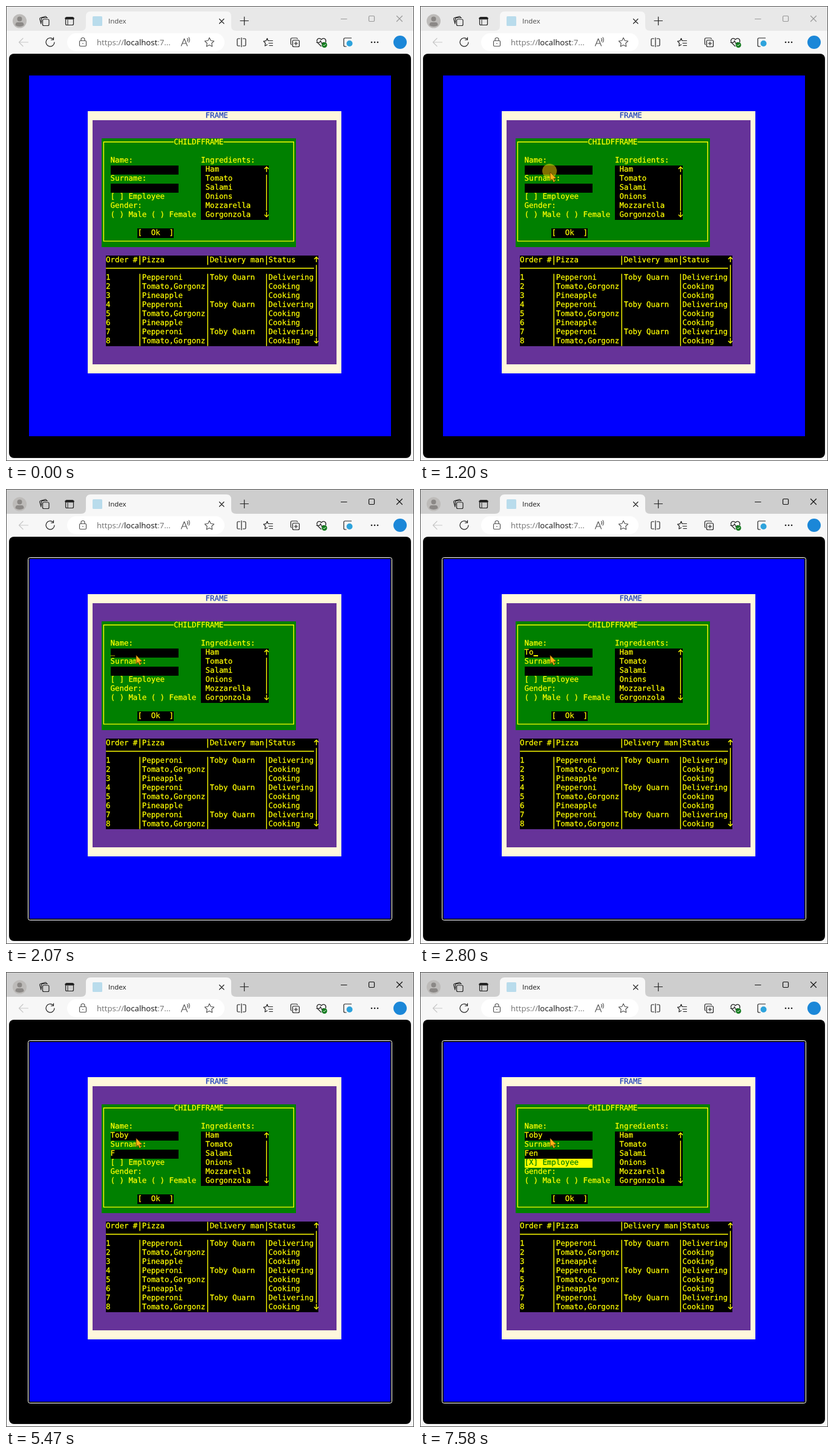
An HTML page for the animation above (8 s loop, 674 px wide and 753 px high).

```html
<!DOCTYPE html>
<html lang="en">
<head>
<meta charset="utf-8">
<title>Index</title>
<style>
  html, body { margin: 0; width: 100%; height: 100%; overflow: hidden; background: #f7f7f7; }
  svg { display: block; width: 674px; height: 753px; }
  text { white-space: pre; }
  .term { font: 12.4px "DejaVu Sans Mono", monospace; text-rendering: geometricPrecision; }
  .term text { stroke-width: .25; }
  .ui { font-family: "Open Sans", "Noto Sans", sans-serif; }
  .icon { fill: none; stroke: #222; stroke-width: 1.2; stroke-linecap: round; stroke-linejoin: round; }
</style>
</head>
<body>
<svg id="stage" viewBox="0 0 674 753">
  <rect width="674" height="753" fill="#f7f7f7"/>
  <path id="titleBar" d="M0 0H674V41H0Z"/>
  <path d="M124 41Q132 41 132 33V17Q132 9 140 9H364Q372 9 372 17V33Q372 41 380 41Z" fill="#f7f7f7"/>
  <path d="M0 .5H674M.5 0V753M673.5 0V753M0 752.5H674" stroke="#555" fill="none"/>

  <!-- title bar -->
  <circle cx="22.5" cy="25" r="11.5" fill="#bdbbb9"/>
  <circle cx="22.5" cy="21.5" r="4" fill="#8b8886"/>
  <path d="M15.5 32Q15.5 27 19 27H26Q29.5 27 29.5 32Q22.5 36 15.5 32Z" fill="#8b8886"/>
  <g class="icon">
    <rect x="60.5" y="22" width="10.5" height="10.5" rx="2"/>
    <path d="M58 29.5L55.8 21.5Q55.5 20 57 19.5L65 17.3Q66.5 17 67 19M58.5 27V21.5Q58.5 19.5 60.5 19.5H68.5"/>
    <rect x="98.5" y="18.5" width="13" height="13" rx="2"/>
    <path d="M99 20.5H111" stroke-width="3.5"/>
    <path d="M102 23V31" stroke-width="1"/>
    <path d="M352.5 21.5L360 29M360 21.5L352.5 29M387 24.5H400.5M393.7 18V31.5"/>
  </g>
  <rect x="143" y="17" width="16" height="16" rx="1.5" fill="#b9dcec"/>
  <text id="tabTitle" class="ui" x="169" y="29" font-size="11.5">Index</text>
  <g id="windowKeys" class="icon" stroke-width="1">
    <path d="M553.5 21.5H563M645.5 16.5L654.5 25.5M654.5 16.5L645.5 25.5"/>
    <rect x="599.5" y="16.5" width="9" height="9" rx="1.5"/>
  </g>

  <!-- toolbar -->
  <rect x="101" y="45" width="260" height="30" rx="15" fill="#fff"/>
  <text class="ui" x="150" y="65" font-size="13.2" fill="#707070">https://<tspan fill="#111">localhost</tspan>:7...</text>
  <g class="icon">
    <path d="M36.5 60H22M28 53.5L21.5 60L28 66.5" stroke="#c8c8c8"/>
    <path d="M80 60A7 7 0 1 1 77.5 54.5M78.5 52V56H74.5"/>
    <g stroke="#555">
      <rect x="121.5" y="57.5" width="11" height="9" rx="1.5"/>
      <path d="M124 57V55.5A3 3 0 0 1 130 55.5V57M127 61.5V62.5"/>
      <path d="M289.5 66L294.5 54L299.5 66M291.5 62H297.5M299.5 53.5Q301.5 56 299.5 58.5M302 52Q304.5 56 302 60"/>
    </g>
    <path id="star" stroke="#555"/>
    <path d="M386.5 54H383.5Q382 54 382 55.5V64.5Q382 66 383.5 66H386.5M391.5 54H394.5Q396 54 396 55.5V64.5Q396 66 394.5 66H391.5M389 52.5V67.5"/>
    <path d="M433 57.5L431.5 53.5L429.5 57.7L425.5 58.3L428.5 61.5L427.8 66L431.5 64M434 57.5H440.5M434 61.5H440.5M435 65.5H440.5"/>
    <rect x="473.5" y="56.5" width="11" height="11" rx="2"/>
    <path d="M471.5 64Q470.5 63.5 470.5 62V55Q470.5 53 472.5 53H479Q481 53 481.5 54M479 59.2V64.8M476.2 62H481.8"/>
    <path d="M520.5 66.5L514.5 60.5Q512.5 57 515 54.5Q518 52.3 521 55.5Q524 52.3 527 54.5Q529.5 57 528 60M513 60.5H518L519.5 57.5L522 62.5L523.5 60.5H526"/>
    <path d="M570.5 53H560Q558 53 558 55V65Q558 67 560 67H562"/>
  </g>
  <circle cx="526" cy="64.5" r="4.5" fill="#157c20"/>
  <path d="M524 64.5L525.5 66L528.2 63" stroke="#fff" fill="none"/>
  <circle cx="567.5" cy="62" r="5" fill="#2ea3dc"/>
  <g fill="#222"><circle cx="604" cy="60" r="1.3"/><circle cx="609" cy="60" r="1.3"/><circle cx="614" cy="60" r="1.3"/></g>
  <circle cx="651" cy="60" r="11" fill="#1b87d8"/>

  <rect x="5" y="79" width="664" height="669" rx="8"/>
  <g id="terminal" class="term"></g>
  <g id="focusRing" fill="none">
    <rect x="38" y="115" width="598" height="597" rx="2" stroke="#101010" stroke-width="2"/>
    <rect x="36.5" y="113.5" width="601" height="600" rx="3" stroke="#fff"/>
  </g>
  <circle id="press" cx="214" cy="273" r="12" fill="#ffe000" opacity=".5"/>
  <path id="pointer" d="M0 0V14.2L3.2 11.3L5.6 16.6L8 15.5L5.7 10.5H10Z" fill="#ffb414" stroke="#5a3000" stroke-width=".8"/>
</svg>
<script>
const LOOP = 8000, CELL_W = 7.475, CELL_H = 14.925, LEFT = 38, TOP = 115;
const YELLOW = '#ff0', GREEN = '#008000';
const byId = id => document.getElementById(id);
const colX = col => LEFT + col * CELL_W;
const rowY = row => TOP + row * CELL_H;
const terminal = byId('terminal');

function add(tag, attrs) {
  const node = document.createElementNS('http://www.w3.org/2000/svg', tag);
  for (const key in attrs) node.setAttribute(key, attrs[key]);
  return terminal.appendChild(node);
}
// Fills cells from column a, row b up to column c, row d; edges snap to whole pixels.
function fill(a, b, c, d, color) {
  const x = Math.round(colX(a)), y = Math.floor(rowY(b));
  return add('rect', { x, y, width: Math.round(colX(c)) - x, height: Math.round(rowY(d)) - y, fill: color });
}
function paint(node, color) {
  node.setAttribute('fill', color);
  node.setAttribute('stroke', color);
}
function write(col, row, string, color = YELLOW) {
  const node = add('text', { x: colX(col), y: rowY(row) + 10 });
  paint(node, color);
  node.textContent = string;
  return node;
}
const line = d => add('path', { d, fill: 'none', stroke: YELLOW, 'stroke-width': 1.4 });
const midX = col => colX(col + .5);
const midY = row => rowY(row) + 5.5;

function scrollBar(col, first, last) {
  const x = midX(col), up = rowY(first) + 1.5, down = rowY(last) + 10.5;
  line(`M${x} ${up + 9}V${up}M${x - 3.5} ${up + 4}L${x} ${up + .5}L${x + 3.5} ${up + 4}`);
  line(`M${x} ${down - 9}V${down}M${x - 3.5} ${down - 4}L${x} ${down - .5}L${x + 3.5} ${down - 4}`);
  line(`M${x} ${rowY(first + 1)}V${rowY(last)}`);
}

fill(0, 0, 80, 40, '#00f');
fill(13, 4, 69, 33, '#fff8dc');
fill(14, 5, 68, 32, '#639');
write(39, 4, 'FRAME', '#24b');

fill(16, 7, 59, 19, GREEN);
line(`M${colX(32)} ${midY(7)}H${midX(16)}V${midY(18)}H${midX(58)}V${midY(7)}H${colX(43)}`);
write(32, 7, 'CHILDFFRAME');
write(18, 9, 'Name:');
write(18, 11, 'Surname:');
write(18, 14, 'Gender:');
write(18, 15, '( ) Male ( ) Female');
fill(18, 10, 33, 11, '#000');
fill(18, 12, 33, 13, '#000');
fill(24, 17, 32, 18, '#000');
write(24, 17, '[  Ok  ]');

write(38, 9, 'Ingredients:');
fill(38, 10, 53, 16, '#000');
['Ham', 'Tomato', 'Salami', 'Onions', 'Mozzarella', 'Gorgonzola']
  .forEach((name, i) => write(39, 10 + i, name));
scrollBar(52, 10, 15);

fill(17, 20, 64, 30, '#000');
const tableRow = (row, id, pizza, man, status) =>
  write(17, row, id.padEnd(8) + pizza.padEnd(15) + man.padEnd(13) + status);
tableRow(20, 'Order #', 'Pizza', 'Delivery man', 'Status');
line(`M${colX(17)} ${midY(21)}H${colX(63)}`);
for (const col of [24, 39, 52])
  line(`M${midX(col)} ${rowY(20)}V${rowY(21)}M${midX(col)} ${rowY(22)}V${rowY(30)}`);
const pizzas = ['Pepperoni', 'Tomato,Gorgonz', 'Pineapple'];
for (let i = 0; i < 8; i++) {
  const sent = i % 3 === 0;
  tableRow(22 + i, String(i + 1), pizzas[i % 3], sent ? 'Toby Quarn' : '', sent ? 'Delivering' : 'Cooking');
}
scrollBar(63, 20, 29);

const highlight = fill(18, 13, 33, 14, YELLOW);
const employee = write(18, 13, '');
const nameText = write(18, 10, '');
const surnameText = write(18, 12, '');
const caret = add('rect', { width: 7.5, height: 2, fill: YELLOW });

let star = '';
for (let i = 0; i < 10; i++) {
  const a = i * Math.PI / 5, r = i % 2 ? 4 : 8;
  star += `${i ? 'L' : 'M'}${336 + r * Math.sin(a)} ${60.5 - r * Math.cos(a)}`;
}
byId('star').setAttribute('d', star + 'Z');

// Each step: time, value
const nameSteps = [[0, 0], [2530, 1], [2800, 2], [4060, 3], [4260, 4]];
const surnameSteps = [[0, 0], [5470, 1], [5800, 2], [5930, 3]];
const caretSteps = [
  [0, 0], [190, 1], [480, .3], [610, 0], [1270, .25], [1340, 1], [1540, .4], [1670, 0],
  [2070, .35], [2200, 1], [2530, 0], [2800, 1], [3810, 0], [4190, 1], [4390, 0],
  [4990, 1], [5190, 0], [5340, .4], [5470, 0], [6010, 1], [6260, .4], [6390, 0], [6790, 1], [6920, 0]
];
// Each step: time, x, y
const pointerPath = [
  [440, 508, 622], [510, 452, 535], [580, 370, 425], [650, 295, 340],
  [720, 245, 290], [790, 222, 270], [860, 217, 268], [910, 217, 268], [1130, 215, 275]
];

const stepAt = (steps, t) => steps.findLast(step => step[0] <= t)[1];

function pathAt(path, t) {
  const i = path.findIndex(point => point[0] > t);
  if (i < 0) return path.at(-1).slice(1);
  if (i === 0) return path[0].slice(1);
  const [t0, x0, y0] = path[i - 1], [t1, x1, y1] = path[i];
  const k = (t - t0) / (t1 - t0);
  return [x0 + (x1 - x0) * k, y0 + (y1 - y0) * k];
}
const show = (node, on) => node.style.visibility = on ? 'visible' : 'hidden';

function draw(t) {
  const active = t >= 1270, checkFocused = t >= 6920;
  byId('titleBar').setAttribute('fill', active ? '#cecece' : '#e8e8e8');
  byId('tabTitle').setAttribute('fill', active ? '#1a1a1a' : '#4a4a4a');
  byId('windowKeys').style.stroke = active ? '#111' : '#999';
  show(byId('focusRing'), t >= 2070);
  show(byId('press'), t >= 1200 && t < 1340);

  const pointer = byId('pointer');
  show(pointer, t >= 440);
  pointer.setAttribute('transform', `translate(${pathAt(pointerPath, t)})`);

  const nameLength = stepAt(nameSteps, t), surnameLength = stepAt(surnameSteps, t);
  nameText.textContent = 'Toby'.slice(0, nameLength);
  surnameText.textContent = 'Fen'.slice(0, surnameLength);

  const inSurname = t >= 4990;
  caret.setAttribute('x', colX(18 + (inSurname ? surnameLength : nameLength)));
  caret.setAttribute('y', inSurname ? 305 : 275);
  caret.setAttribute('opacity', stepAt(caretSteps, t));

  show(highlight, checkFocused);
  employee.textContent = `[${t >= 7580 ? 'X' : ' '}] Employee`;
  paint(employee, checkFocused ? GREEN : YELLOW);
}

const start = performance.now();
function tick() {
  draw((performance.now() - start) % LOOP);
  requestAnimationFrame(tick);
}
tick();
</script>
</body>
</html>
```
